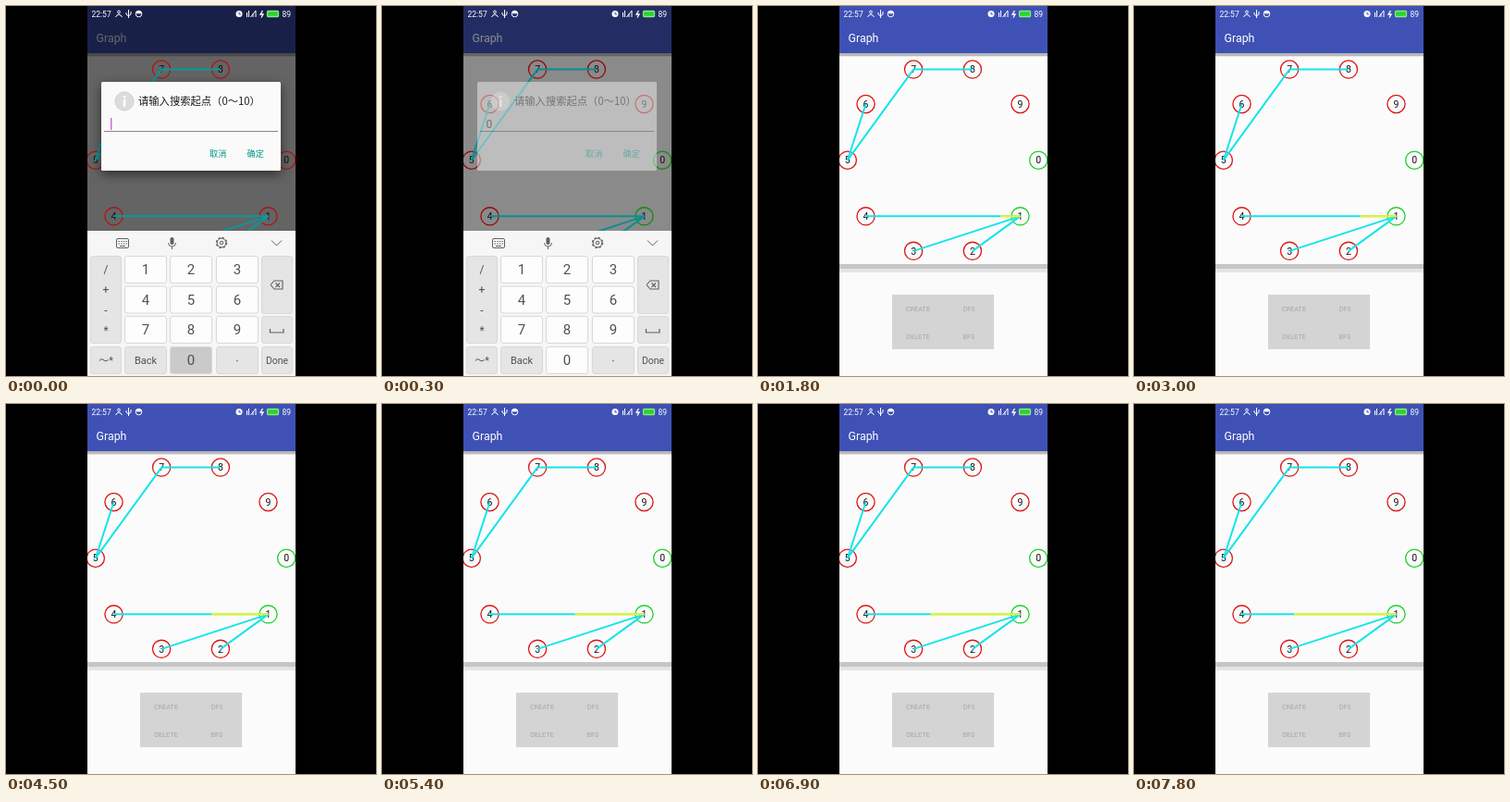
These frames come from a looping animation (400x400 px, 8000 ms). An HTML page with a canvas:

```html
<!DOCTYPE html>
<html lang="zh">
<head>
<meta charset="utf-8">
<style>
html, body { margin: 0; width: 100%; height: 100%; overflow: hidden; background: #000; }
canvas { display: block; }
</style>
</head>
<body>
<canvas width="400" height="400"></canvas>
<script>
const c = document.querySelector('canvas').getContext('2d');
const LOOP = 8000, STEP = 300;
const SANS = 'Roboto, sans-serif', CJK = '"Noto Sans CJK SC", "Noto Sans CJK", sans-serif';
const EDGES = [[7, 8], [6, 5], [5, 7], [4, 1], [1, 3], [1, 2]];
const LOOKS = [
  { dim: .6, edge: '#08989b', ring: '#b01414', done: '#b01414' },
  { dim: .45, edge: '#068f92', ring: '#960808', done: '#128a12' },
  { dim: 0, edge: '#14e4ea', ring: '#dc1414', done: '#1fd02a' }
];
const nodes = Array.from({ length: 10 }, (_, i) => {
  const a = i * Math.PI / 5;
  return [200 + 103.2 * Math.cos(a), 166.7 + 103.2 * Math.sin(a)];
});

function rect(x, y, w, h, fill) {
  c.fillStyle = fill;
  c.fillRect(x, y, w, h);
}

function box(x, y, w, h, r, fill, stroke) {
  c.beginPath();
  c.roundRect(x, y, w, h, r);
  if (fill) { c.fillStyle = fill; c.fill(); }
  if (stroke) { c.strokeStyle = stroke; c.stroke(); }
}

function line(color, width, ...p) {
  c.beginPath();
  for (let i = 0; i < p.length; i += 2) c.lineTo(p[i], p[i + 1]);
  c.strokeStyle = color;
  c.lineWidth = width;
  c.stroke();
}

function circle(x, y, r, fill, stroke, width = 1) {
  c.beginPath();
  c.arc(x, y, r, 0, 7);
  if (fill) { c.fillStyle = fill; c.fill(); }
  if (stroke) { c.strokeStyle = stroke; c.lineWidth = width; c.stroke(); }
}

function text(s, x, y, size, color, align = 'left', family = SANS) {
  c.font = size + 'px ' + family;
  c.textAlign = align;
  c.fillStyle = color;
  c.fillText(s, x, y);
}

function page(dim) {
  rect(88, 0, 225, 400, '#fbfbfb');
  rect(88, 0, 225, 51, '#3f51b5');
  text('Graph', 97.5, 38.5, 12.4, '#fff');
  rect(88, 51, 225, 3, '#b8b8b8');
  rect(88, 54, 225, 1, '#e6e6e6');
  rect(88, 279, 225, 5, '#c6c6c6');
  rect(88, 284, 225, 4, '#e4e4e4');
  rect(145, 312, 110, 59, '#d4d4d4');
  [['CREATE', 173, 330], ['DFS', 228, 330], ['DELETE', 173, 359.5], ['BFS', 228, 359.5]]
    .forEach(([s, x, y]) => text(s, x, y, 7.3, '#a6a6a6', 'center'));
  rect(88, 0, 225, 400, `rgba(0,0,0,${dim})`);
}

function status() {
  const w = '#fff';
  text('22:57', 92.5, 11.5, 8.5, w);
  circle(122, 6.5, 1.4, null, w);
  line(w, 1, 118.5, 12, 120, 10, 122, 9, 124, 10, 125.5, 12);
  line(w, 1, 132.5, 4, 132.5, 13);
  line(w, 1, 130, 7, 130, 9, 132.5, 11, 135, 9, 135, 6);
  circle(143.5, 8.5, 3.3, null, w);
  c.beginPath();
  c.arc(143.5, 8.5, 3.3, 3.2, 6.2);
  c.fillStyle = w;
  c.fill();
  circle(252, 8.5, 3.5, w);
  line('#3f51b5', 1, 252, 6.5, 252, 9, 254, 9);
  line(w, 1, 260.5, 7, 260.5, 12);
  line(w, 1, 262.5, 5, 262.5, 12);
  line(w, 1, 264.5, 12, 270, 5, 270, 12);
  line(w, 1, 267, 12, 267, 8.5);
  line(w, 1.3, 277.5, 5, 275, 9, 278, 9, 276, 12.5);
  box(282.5, 5.5, 12, 6, 1, '#28d528', '#8be58b');
  text('89', 298.5, 11.8, 8.5, w);
}

function graph(look, tip) {
  nodes.forEach(([x, y], i) => {
    circle(x, y, 9.6, null, i < 2 ? look.done : look.ring, 1.3);
    text(i, x, y + 3.7, 10.5, '#111', 'center');
  });
  EDGES.forEach(([a, b]) => line(look.edge, 2, ...nodes[a], ...nodes[b]));
  if (tip) line('#f6f414', 2, ...nodes[1], tip, nodes[1][1]);
}

function dialog(open) {
  c.save();
  c.globalAlpha = open ? 1 : .45;
  if (open) {
    c.shadowColor = 'rgba(0,0,0,.55)';
    c.shadowBlur = 12;
    c.shadowOffsetY = 4;
  }
  box(103, 82, 194, 96, 1.5, '#fafafa');
  c.shadowColor = 'transparent';
  circle(128, 103, 10, '#dcdcdc', '#cfcfcf');
  rect(126.8, 97, 2.6, 2.4, '#fff');
  rect(126.8, 101, 2.6, 8, '#fff');
  text('请输入搜索起点（0～10）', 143, 107.3, 11.3, '#1c1c1c', 'left', CJK);
  line(open ? '#888' : '#444', 1.2, 106, 135.5, 294, 135.5);
  if (open) line('#c04fc8', 1.2, 113.8, 121, 113.8, 134);
  else text('0', 112.5, 132, 12, '#111');
  text('取消', 220, 163.2, 9.2, '#009688', 'left', CJK);
  text('确定', 260.5, 163.2, 9.2, '#009688', 'left', CJK);
  c.restore();
}

function key(x, y, w, h, label, fill, size) {
  c.lineWidth = 1;
  box(x + .5, y + .5, w - 1, h - 1, 2.5, fill, '#d8d8d8');
  text(label, x + w / 2, y + h / 2 + size * .36, size, '#505050', 'center');
}

function keyboard(pressed) {
  const ink = '#606060', grey = '#e5e5e5', white = '#fdfdfd';
  rect(88, 243, 225, 157, '#f6f6f6');
  c.lineWidth = 1;
  box(119.5, 251.5, 13, 10, 1.5, null, ink);
  c.setLineDash([1.5, 1.2]);
  line(ink, 1.2, 121.5, 254.5, 131, 254.5);
  line(ink, 1.2, 121.5, 257, 131, 257);
  c.setLineDash([]);
  line(ink, 1, 123, 259.5, 129, 259.5);
  box(177.5, 250, 4, 8, 2, ink);
  c.beginPath();
  c.arc(179.5, 256, 4, 0, Math.PI);
  c.lineWidth = 1;
  c.stroke();
  line(ink, 1, 179.5, 260, 179.5, 263);
  c.setLineDash([2.4, 2]);
  circle(233, 256, 5.6, null, ink, 1.3);
  c.setLineDash([]);
  circle(233, 256, 4.8, null, ink);
  circle(233, 256, 1.8, null, ink);
  line(ink, 1, 287, 253.5, 292.5, 259, 298, 253.5);

  key(91, 270, 34, 95, '', grey, 12);
  ['/', '+', '-', '*'].forEach((s, i) => text(s, 108, 289 + i * 22, 12, '#505050', 'center'));
  for (let i = 0; i < 9; i++)
    key([128, 177, 227][i % 3], 270 + 32.5 * Math.floor(i / 3), 46, 30, i + 1, white, 15);
  key(276, 270, 34, 63, '', grey, 12);
  line(ink, 1.1, 286, 301.5, 290, 297, 299, 297, 299, 306, 290, 306, 286, 301.5);
  line(ink, 1.1, 291.5, 299.5, 296, 304);
  line(ink, 1.1, 296, 299.5, 291.5, 304);
  key(276, 335, 34, 30, '', grey, 12);
  line(ink, 1.2, 285.5, 349, 285.5, 353, 300, 353, 300, 349);
  key(91, 368, 34, 30, '～*', grey, 11);
  key(128, 368, 46, 30, 'Back', grey, 11);
  key(177, 368, 46, 30, '0', pressed ? '#cacaca' : white, 15);
  key(227, 368, 46, 30, '·', grey, 13);
  key(276, 368, 34, 30, 'Done', grey, 10.5);
}

function draw(now) {
  const step = Math.floor(now % LOOP / STEP);
  const look = LOOKS[Math.min(step, 2)];
  rect(0, 0, 400, 400, '#000');
  c.save();
  c.beginPath();
  c.rect(88, 0, 225, 400);
  c.clip();
  page(look.dim);
  status();
  graph(look, step > 1 ? 288.7 - 4.45 * step : 0);
  if (step < 2) {
    dialog(step === 0);
    keyboard(step === 0);
  }
  c.restore();
}

const start = performance.now();
function tick() {
  draw(performance.now() - start);
  requestAnimationFrame(tick);
}
tick();
</script>
</body>
</html>
```
